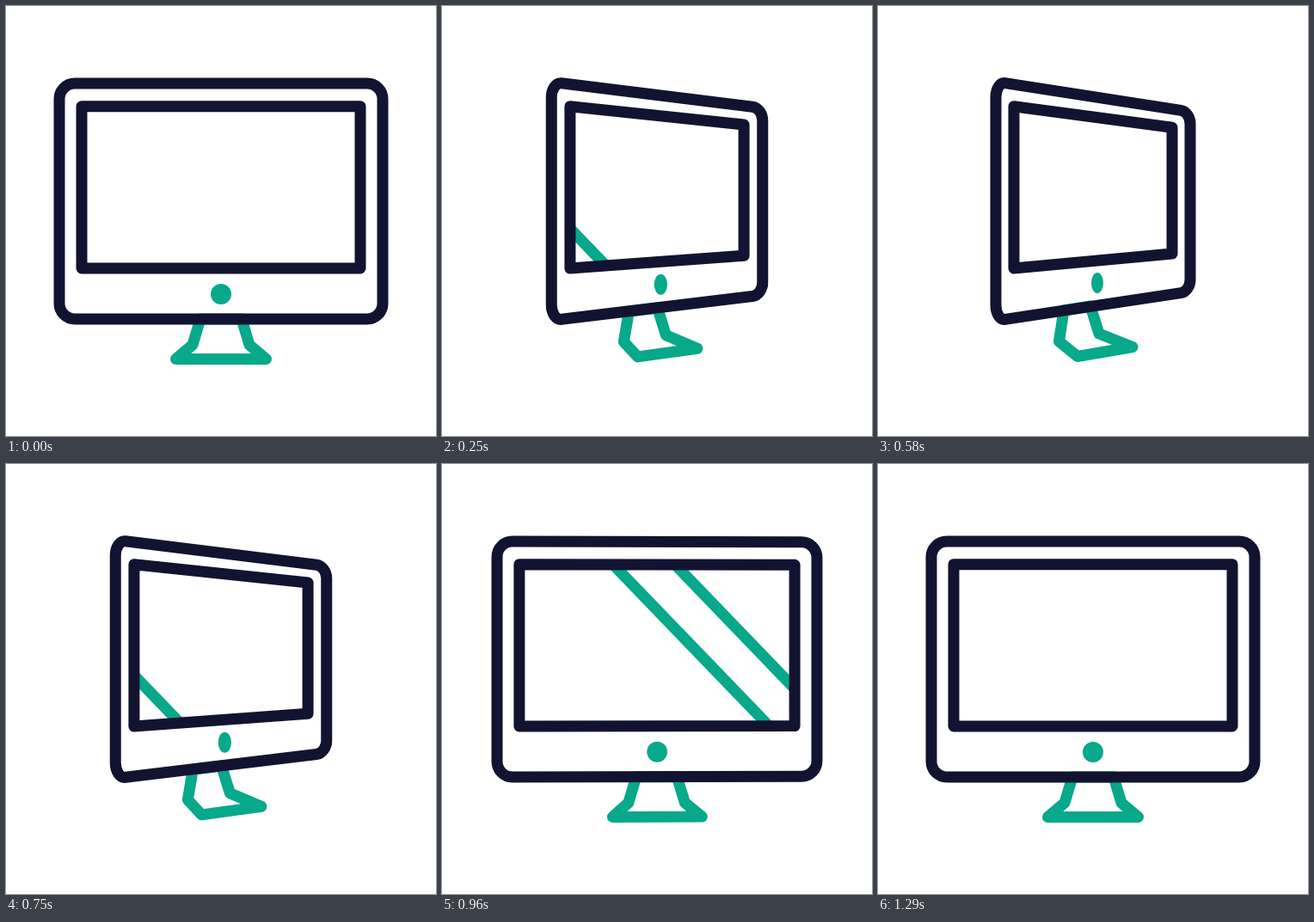
Recreate the animation shown at these times as an HTML page. Size 500x500 px, loop 1.33 s.

```html
<!DOCTYPE html>
<html lang="en">
<head>
<meta charset="utf-8">
<title>Turning monitor</title>
<style>
  html, body { margin: 0; width: 100%; height: 100%; overflow: hidden; background: #fff; }
  svg { display: block; width: 100vw; height: 100vh; }
  .line { fill: none; stroke-width: 13; stroke-linecap: round; stroke-linejoin: round; }
  .dark { stroke: #121331; }
  .green { stroke: #08a88a; }
</style>
</head>
<body>
<svg viewBox="0 0 500 500">
  <clipPath id="glass"><path id="pane"/></clipPath>
  <path id="stand" class="line green"/>
  <g clip-path="url(#glass)">
    <path id="shine" d="M-58 62l270 280M-130 62l270 280" fill="none" stroke="#08a88a" stroke-width="13"/>
  </g>
  <path id="screen" class="line dark"/>
  <path id="body" class="line dark"/>
  <ellipse id="dot" fill="#08a88a"/>
</svg>
<script>
const LOOP = 1330, STEP = 1000 / 24, MID = 250;
const $ = id => document.getElementById(id);

const clamp = x => Math.min(1, Math.max(0, x));
const mix = (a, b, p) => a + (b - a) * p;
const mixPt = (a, b, p) => a.map((v, i) => mix(v, b[i], p));
const polygon = pts => "M" + pts.join("L") + "Z";
const smooth = x => x * x * (3 - 2 * x);

// The stand is symmetric from the front: left leg, then its mirror image
const leg = [[226, 364], [217, 394], [197.5, 410.5]];
const standFront = [...leg, ...leg.map(([x, y]) => [2 * MID - x, y]).reverse()];
const standTurned = [[216, 354], [210.5, 390], [232, 407.5], [296, 396.5], [257, 381], [247, 349]];

// Upright panel whose far (right) side shrinks by drop and rise
function panel(half, top, bottom, drop, rise) {
  const l = MID - half, r = MID + half;
  return [[l, top], [r, top + drop], [r, bottom - rise], [l, bottom]];
}

// Round each corner by the same share of its two edges
function rounded(pts, shareX, shareY) {
  return pts.map((tip, i) => {
    const prev = pts[(i + 3) % 4], next = pts[(i + 1) % 4];
    const [cutIn, cutOut] = i % 2 ? [shareX, shareY] : [shareY, shareX];
    const a = mixPt(tip, prev, cutIn), b = mixPt(tip, next, cutOut);
    return `${i ? "L" : "M"}${a}C${mixPt(a, tip, 0.55)} ${mixPt(b, tip, 0.55)} ${b}`;
  }).join("") + "Z";
}

// Cubic bezier ease (.33, 0, .73, 1), solved by bisection
function ease(x) {
  let lo = 0, hi = 1;
  for (let i = 0; i < 20; i++) {
    const u = (lo + hi) / 2, v = 1 - u;
    if (v * v * u + 2.19 * v * u * u + u * u * u < x) lo = u; else hi = u;
  }
  return smooth((lo + hi) / 2);
}

function draw(ms) {
  // 24 steps a second over motion timed at 30
  const k = Math.floor((ms % LOOP + 3.4) / STEP);
  const n = k < 16 ? Math.round(k * 1.25) : Math.ceil(k * 1.25 - 0.5);
  const turn = ease(clamp(Math.min(n, 30 - n) / 10));

  const body = panel(mix(188, 113, turn), 90 - 2 * turn, 364 + 2 * turn, 35 * turn, 34 * turn);
  const screen = polygon(panel(mix(162, 92, turn), 116.7, 305, 24.5 * turn, 17 * turn));
  $("body").setAttribute("d", rounded(body, 18 / 376, 18 / 274));
  $("screen").setAttribute("d", screen);
  $("pane").setAttribute("d", screen);
  $("stand").setAttribute("d", polygon(standFront.map((pt, i) => mixPt(pt, standTurned[i], turn))));

  const dot = { cx: MID + 5 * turn, cy: 335 - 13 * turn, rx: 12 - 5 * turn, ry: 12 };
  for (const key in dot) $("dot").setAttribute(key, dot[key]);

  const sweep = n < 18 ? (n - 3.6) / 16.4 : (n - 15.3) / 23.4;
  const x = mix(-85, 491, smooth(clamp(sweep)));
  $("shine").setAttribute("transform", `translate(${x} 0)`);
}

const start = performance.now();
function tick() {
  draw(performance.now() - start);
  requestAnimationFrame(tick);
}
tick();
</script>
</body>
</html>
```
